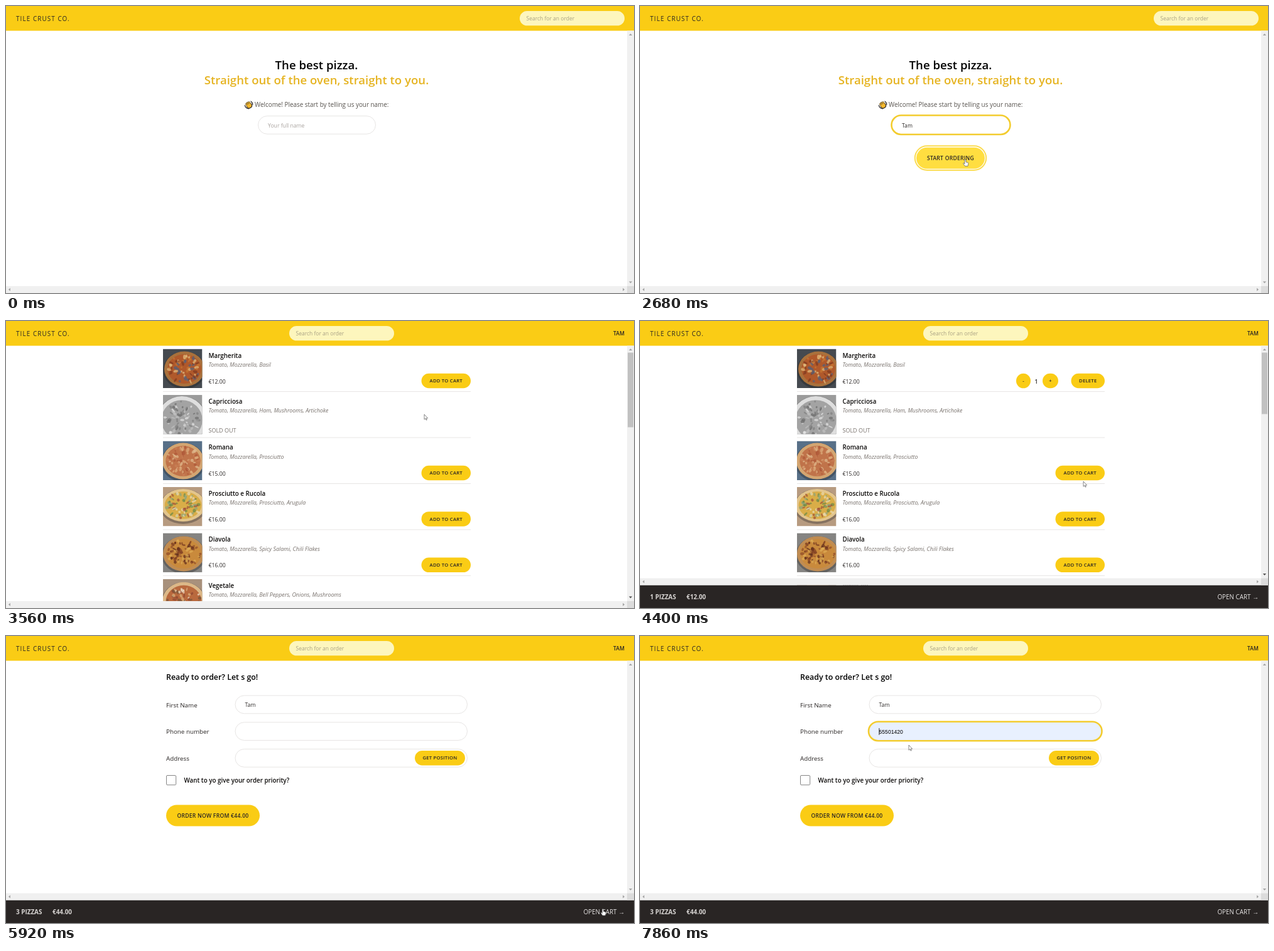
An HTML page with a canvas that plays this animation: 1000x458 px, repeating every 8000 ms.

```html
<!DOCTYPE html>
<html lang="en">
<head>
<meta charset="utf-8">
<title>Pizza ordering</title>
<style>
html, body { margin: 0; width: 100%; height: 100%; overflow: hidden; background: #fff; }
canvas { display: block; width: 1000px; height: 458px; }
</style>
</head>
<body>
<canvas id="stage"></canvas>
<script>
const LOOP = 8000;
const SANS = '"Open Sans", "Noto Sans", sans-serif';
const YELLOW = '#facc15', INK = '#292524', BLACK = '#0c0a09', GREY = '#78716c', LINE = '#e7e5e4';
const COMPANY = 'TILE CRUST CO.', CUSTOMER = 'Tam', PHONE = '55501420';

// Moments at which the screen changes
const FOCUS_NAME = 1070, TYPE_START = 1360, TYPE_STEP = 200;
const HOVER_START = 2380, PRESS_START = 2600, MENU = 2810;
const FORM = 5900, FOCUS_PHONE = 7400, AUTOFILL = 7860;

// photo: table, crust and sauce colours, then centre and radii of the pizza
const PIZZAS = [
  { name: 'Margherita', with: 'Basil', price: 12, added: 4120,
    photo: ['#454a50', '#a9713c', '#b0592b', 34, 32, 32, 28], toppings: ['#e3bf80', '#c87832', '#7e3a20', '#54607a'] },
  { name: 'Capricciosa', with: 'Ham, Mushrooms, Artichoke', price: 0,
    photo: ['#9b9b9b', '#dedede', '#a3a3a3', 30, 40, 39, 38], toppings: ['#e6e6e6', '#808080', '#c2c2c2', '#6d6d6d'] },
  { name: 'Romana', with: 'Prosciutto', price: 15,
    photo: ['#587088', '#d3a571', '#c0734a', 32, 32, 33, 29], toppings: ['#dfaf7f', '#cb8156', '#ae5838', '#e2bd90'] },
  { name: 'Prosciutto e Rucola', with: 'Prosciutto, Arugula', price: 16, added: 4560,
    photo: ['#b79b80', '#e3c58c', '#d9ad48', 32, 29, 35, 26], toppings: ['#6c8a48', '#a0503a', '#ecdcb4', '#8fa67c'] },
  { name: 'Diavola', with: 'Spicy Salami, Chili Flakes', price: 16, added: 4980,
    photo: ['#858482', '#c08c52', '#c98a3c', 33, 33, 33, 28], toppings: ['#74351f', '#8f4a28', '#e0b058', '#5e2c1c'] },
  { name: 'Vegetale', with: 'Bell Peppers, Onions, Mushrooms', price: 13,
    photo: ['#a8917c', '#dcb888', '#b9693e', 33, 36, 34, 31], toppings: ['#efe0c8', '#8c4632', '#dcb480', '#76543a'] }
];

// Pointer path: time, tip x, tip y, shape held until the next point
const POINTER = [
  [0, 640, 470, 'none'], [270, 640, 470, 'arrow'], [860, 470, 190, 'beam'],
  [TYPE_START, 470, 190, 'none'], [2080, 470, 190, 'arrow'], [HOVER_START, 512, 236, 'hand'],
  [PRESS_START, 518, 245, 'hand'], [MENU, 518, 245, 'arrow'], [3480, 666, 149, 'arrow'],
  [3640, 666, 149, 'arrow'], [4020, 706, 92, 'hand'], [4200, 706, 92, 'arrow'],
  [4500, 706, 312, 'hand'], [4640, 706, 312, 'arrow'], [4880, 706, 386, 'hand'],
  [5300, 706, 386, 'arrow'], [5650, 952, 436, 'hand'], [FORM, 952, 436, 'hand'],
  [6630, 311, 247, 'hand'], [7050, 311, 247, 'arrow'], [FOCUS_PHONE, 420, 152, 'beam'],
  [7520, 420, 152, 'arrow'], [7700, 428, 174, 'arrow'], [LOOP, 428, 174, 'arrow']
];
const SHAPES = {
  arrow: new Path2D('M0 0V8.2L1.9 6.5 3.1 9.2 4.3 8.7 3.1 6.1H5.6Z'),
  hand: new Path2D('M-1 1Q-1 0 0 0T1 1V4L4 4.8Q5 5 4.8 6.5L4 10.5H-.5L-3.3 6.5Q-3.4 5.2-2.2 5.7L-1 7Z'),
  beam: new Path2D('M-2-5H2M0-5V5M-2 5H2')
};

const canvas = document.getElementById('stage');
const ctx = canvas.getContext('2d');
const scale = window.devicePixelRatio || 1;
canvas.width = 1000 * scale;
canvas.height = 458 * scale;

const clamp = v => Math.min(1, Math.max(0, v));
const ease = v => v * v * (3 - 2 * v);
const euro = n => `€${n}.00`;

function rect(x, y, w, h, fill) {
  ctx.fillStyle = fill;
  ctx.fillRect(x, y, w, h);
}

function pill(x, y, w, h, fill, stroke, lineWidth = 1, radius = h / 2) {
  ctx.beginPath();
  ctx.roundRect(x, y, w, h, radius);
  if (fill) { ctx.fillStyle = fill; ctx.fill(); }
  if (stroke) { ctx.strokeStyle = stroke; ctx.lineWidth = lineWidth; ctx.stroke(); }
}

// y is the middle of the capital letters
function text(str, x, y, size, { color = INK, weight = 400, align = 'left', spacing = 0, style = '', family = SANS } = {}) {
  ctx.font = `${style} ${weight} ${size}px ${family}`;
  ctx.letterSpacing = `${spacing}px`;
  ctx.textAlign = align;
  ctx.fillStyle = color;
  ctx.fillText(str, x, y + size * 0.357);
}

function button(label, x, y, w, h = 23.5, size = 7.7, fill = YELLOW) {
  pill(x, y, w, h, fill);
  text(label, x + w / 2, y + h / 2, size, { weight: 600, align: 'center', spacing: 0.23 });
}

function field(x, y, w, value, { focused = false, fill = '#fff', color = INK, family = SANS } = {}) {
  if (focused) pill(x - 0.5, y - 0.5, w + 1, 30.5, fill, '#f3cc2e', 2.6);
  else pill(x + 0.5, y + 0.5, w - 1, 28.8, fill, LINE);
  text(value, x + 16, y + 15.5, 8.65, { color, family });
}

function header(user) {
  rect(0, 0, 1000, 39.5, YELLOW);
  text(COMPANY, 16, 20, 9.9, { spacing: 1.1 });
  const x = user ? 451 : 818;
  pill(x, 8, 167, 23.3, '#fdf6bd');
  text('Search for an order', x + 10.5, 20, 8.5, { color: '#a8a084' });
  if (user) text(user.toUpperCase(), 985, 20, 8.65, { weight: 600, align: 'right' });
}

function triangle(x, y, angle, color) {
  ctx.save();
  ctx.translate(x, y);
  ctx.rotate(angle);
  ctx.fillStyle = color;
  ctx.fill(new Path2D('M-2.6 1.4L0-1.6 2.6 1.4Z'));
  ctx.restore();
}

function scrollbars(bottom, thumb) {
  rect(0, bottom - 11, 1000, 11, '#f0f0f0');
  rect(989, 39.5, 11, bottom - 50.5, '#f0f0f0');
  rect(989, bottom - 11, 11, 11, '#dcdcdc');
  if (thumb) rect(990, 50.5, 9, thumb, '#c1c1c1');
  triangle(994.5, 45.5, 0, '#a3a3a3');
  triangle(994.5, bottom - 17, Math.PI, thumb ? '#505050' : '#a3a3a3');
  triangle(5.5, bottom - 5.5, -Math.PI / 2, '#a3a3a3');
  triangle(983.5, bottom - 5.5, Math.PI / 2, '#a3a3a3');
}

function wavingHand() {
  ctx.save();
  ctx.translate(386.5, 157.5);
  ctx.rotate(-0.55);
  pill(-4, -1.5, 8, 7, '#f5b82e', INK, 1.2, 3);
  for (let i = 0; i < 4; i++) pill(-4 + i * 1.9, -5 + Math.abs(i - 1.5) * 0.6, 2, 7, '#f5b82e', INK, 0.5, 1);
  pill(-3.3, -1, 6.6, 5.5, '#f5b82e', null, 1, 2.5);
  ctx.lineWidth = 1.2;
  ctx.beginPath();
  ctx.arc(0, 0, 6.3, 2, 3.6);
  ctx.moveTo(5.7, -2.6);
  ctx.arc(0, 0, 6.3, -0.43, 0.6);
  ctx.stroke();
  ctx.restore();
}

function home(t) {
  header();
  text('The best pizza.', 494.5, 94.5, 18.6, { color: '#000', weight: 600, align: 'center' });
  text('Straight out of the oven, straight to you.', 494.5, 118, 18.6, { color: '#e6b422', weight: 600, align: 'center' });
  wavingHand();
  text('Welcome! Please start by telling us your name:', 396, 157.5, 9.9, { color: '#57534e' });

  const typed = CUSTOMER.slice(0, clamp((Math.floor((t - TYPE_START) / TYPE_STEP) + 1) / 3) * 3);
  field(401, 175, 188, typed || 'Your full name', { focused: t >= FOCUS_NAME, color: typed ? INK : '#a8a29e' });
  if (typed) {
    const hover = clamp((t - HOVER_START) / 300);
    const mix = (a, b) => Math.round(a + (b - a) * hover);
    if (t >= PRESS_START) pill(437.8, 223.2, 113.4, 38.8, null, '#fbdc52', 2);
    button('START ORDERING', 440, 225.8, 109, 34, 8.65, `rgb(${mix(250, 255)},${mix(204, 222)},${mix(21, 64)})`);
  }
  scrollbars(458);
}

function photo({ photo: [table, crust, sauce, cx, cy, rx, ry], toppings }, x, y, seed) {
  const random = () => (seed = (seed * 16807) % 2147483647) / 2147483647;
  const disc = (dx, dy, w, h, fill, tilt = 0) => {
    ctx.beginPath();
    ctx.ellipse(x + dx, y + dy, w, h, tilt, 0, 7);
    ctx.fillStyle = fill;
    ctx.fill();
  };
  ctx.save();
  ctx.beginPath();
  ctx.rect(x, y, 62.5, 62.5);
  ctx.clip();
  rect(x, y, 62.5, 62.5, table);
  disc(cx, cy + 2, rx + 2, ry + 2, 'rgba(20,20,20,.3)');
  disc(cx, cy, rx, ry, crust);
  disc(cx, cy, rx * 0.84, ry * 0.84, sauce);
  ctx.globalAlpha = 0.7;
  for (let i = 0; i < 72; i++) {
    const angle = random() * 6.283, far = Math.sqrt(random()) * 0.8;
    disc(cx + Math.cos(angle) * far * rx, cy + Math.sin(angle) * far * ry,
      1.4 + random() * 2.6, 1 + random() * 1.6, toppings[i % 4], angle);
  }
  ctx.restore();
}

function menuRow(pizza, index, t) {
  const y = 44.6 + index * 73.45;
  const { name, price, added } = pizza;
  photo(pizza, 250, y, 7919 * (index + 3));
  text(name, 322.5, y + 10.5, 9.8, { color: BLACK, weight: 600 });
  text(`Tomato, Mozzarella, ${pizza.with}`, 322.5, y + 25, 8.9, { color: GREY, style: 'italic' });
  rect(250, y + 67.5, 490, 1, LINE);
  if (!price) {
    text('SOLD OUT', 322.5, y + 56.5, 9, { color: GREY });
    return;
  }
  text(euro(price), 322.5, y + 52, 8.65);
  if (t >= added) {
    button('-', 599, y + 39.2, 23);
    text('1', 631, y + 52, 8.65, { weight: 600, align: 'center' });
    button('+', 641, y + 39.2, 25);
    button('DELETE', 686.5, y + 39.2, 53.5);
  } else {
    button('ADD TO CART', 661.5, y + 39.2, 78.5);
  }
}

function cartBar(cart) {
  const total = cart.reduce((sum, pizza) => sum + pizza.price, 0);
  text(`${cart.length} PIZZAS`, 16, 440, 9.9, { color: '#d6d3d1', weight: 700 });
  text(euro(total), 74, 440, 9.9, { color: '#d6d3d1', weight: 700 });
  text('OPEN CART →', 985, 440, 9.9, { color: '#e7e5e4', align: 'right' });
}

function form(t) {
  text('Ready to order? Let s go!', 255, 65.5, 12.4, { color: '#000', weight: 600 });
  ['First Name', 'Phone number', 'Address'].forEach((label, i) => text(label, 255, 110.3 + i * 42.7, 9.8));
  const filled = t >= AUTOFILL, focused = t >= FOCUS_PHONE;
  field(364.5, 94.5, 370.5, CUSTOMER);
  field(364.5, 137.2, 370.5, filled ? PHONE : '', {
    focused, fill: filled ? '#e8f0fe' : '#fff', color: '#000', family: '"Liberation Sans", Arial, sans-serif'
  });
  if (focused) rect(380.5, 147, 0.8, 11, '#000');
  field(364.5, 179.9, 370.5, '');
  button('GET POSITION', 651, 183, 80);
  pill(255.5, 222.5, 15.2, 15.2, '#fff', '#858585', 1, 1.5);
  text('Want to yo give your order priority?', 283.5, 231, 9.8, { color: BLACK, weight: 600 });
  button('ORDER NOW FROM €44.00', 255, 269.5, 149, 34, 8.65);
}

function shop(t) {
  const cart = PIZZAS.filter(pizza => t >= pizza.added);
  const bottom = cart.length ? 421.5 : 458;
  if (t >= FORM) form(t);
  else PIZZAS.forEach((pizza, i) => menuRow(pizza, i, t));
  header(CUSTOMER);
  rect(0, bottom, 1000, 458 - bottom, INK);
  scrollbars(bottom, t < FORM && (cart.length ? 98 : 119));
  if (cart.length) cartBar(cart);
}

function pointer(t) {
  const next = POINTER.findIndex(point => point[0] > t);
  const [t0, x0, y0, shape] = POINTER[next - 1];
  const [t1, x1, y1] = POINTER[next];
  if (shape === 'none') return;
  const k = ease((t - t0) / (t1 - t0));
  ctx.save();
  ctx.translate(x0 + (x1 - x0) * k, y0 + (y1 - y0) * k);
  ctx.lineWidth = 0.7;
  ctx.strokeStyle = '#555';
  ctx.fillStyle = '#fff';
  if (shape !== 'beam') ctx.fill(SHAPES[shape]);
  ctx.stroke(SHAPES[shape]);
  ctx.restore();
}

function draw(now) {
  const t = now % LOOP;
  ctx.setTransform(scale, 0, 0, scale, 0, 0);
  rect(0, 0, 1000, 458, '#fff');
  if (t < MENU) home(t);
  else shop(t);
  pointer(t);
  requestAnimationFrame(draw);
}
requestAnimationFrame(draw);
</script>
</body>
</html>
```
